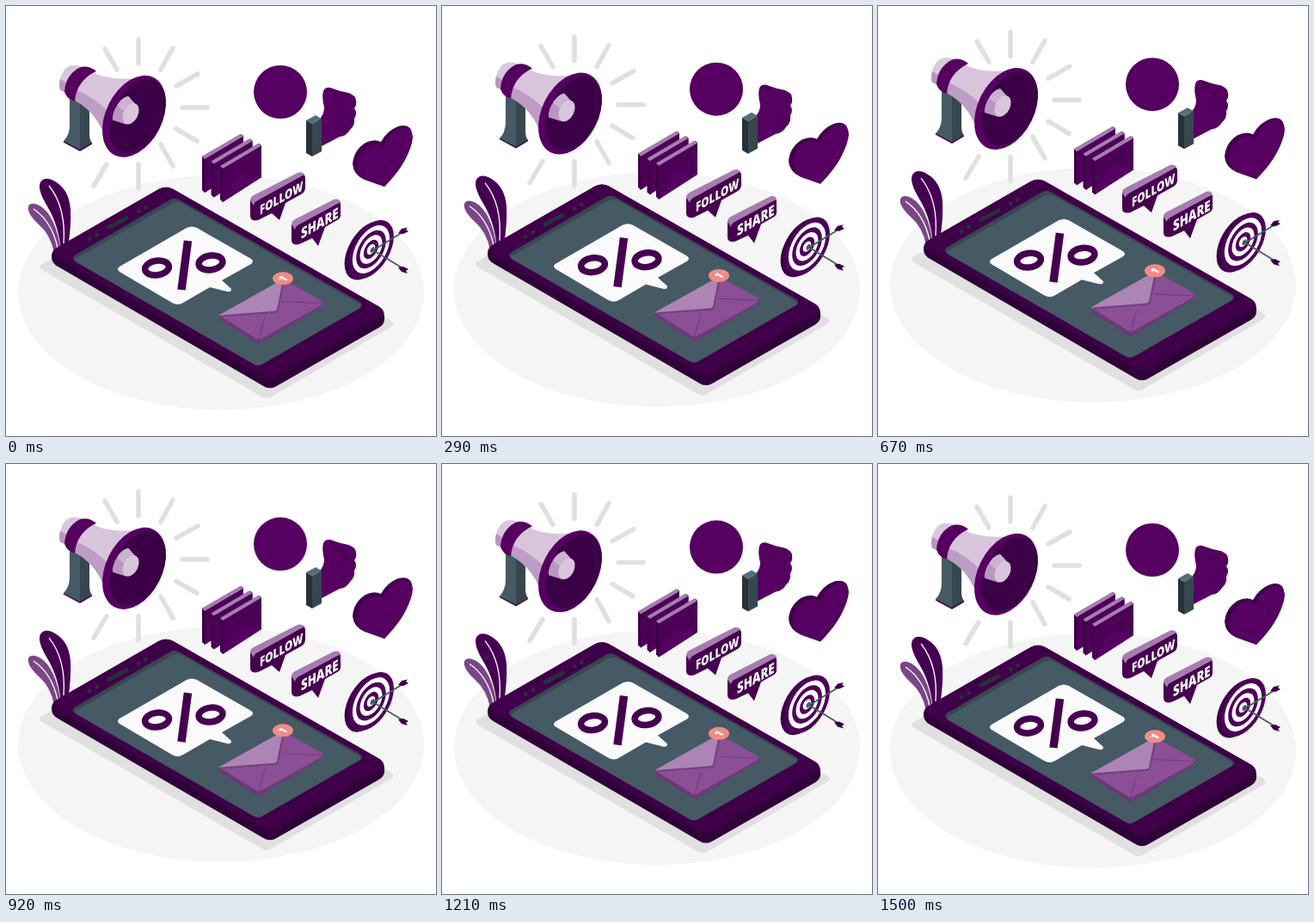
Write an HTML page that moves like this. It is 500 px wide and 500 px high and loops after 1540 ms.

```html
<!DOCTYPE html>
<html lang="en">
<head>
<meta charset="utf-8">
<title>Isometric phone promotion</title>
<style>
  html, body { margin: 0; width: 100%; height: 100%; overflow: hidden; background: #fff; }
  svg { display: block; width: 100vw; height: 100vh; }
  text { font: 800 15px "Open Sans", "Noto Sans", sans-serif; fill: #fff; }
  .dark { fill: #3c0046; }
  .plum { fill: #560062; }
  .lilac { fill: #a67db0; }
  .line { fill: none; stroke: #3c0046; stroke-linecap: round; stroke-linejoin: round; }
</style>
</head>
<body>
<svg viewBox="0 0 500 500">
  <defs>
    <g id="mail">
      <path class="dark" d="M228 175L273 149L276 151V188L231 217L228 214Z"/>
      <path fill="#4d0058" d="M231 178L276 152V188L231 217Z"/>
      <path class="plum" d="M231 217L250 183L276 188Z"/>
      <path class="lilac" d="M228 175L272 149L276 151.500L231 178Z"/>
      <path class="line" d="M231 180L252 184L275 154"/>
    </g>
  </defs>
  <g id="scene">
    <ellipse cx="250" cy="333" rx="236" ry="136.500" fill="#f5f5f5"/>
    <path fill="#e0e0e0" d="M42 300L62 289L430 355L448 366Q453 370 448 373L309 454Q303 458 297 454L42 307Q36 303 42 300Z"/>

    <!-- Plant -->
    <path fill="#7b4687" d="M56 287Q52 266 38 254Q24 241 26 233Q29 227 39 232Q58 243 64 286Z"/>
    <path fill="#460052" d="M64 287Q62 256 48 233Q36 213 40 205Q45 197 57 204Q73 213 75 236Q76 257 72 280Z"/>
    <path fill="none" stroke="#fff" stroke-width="1.300" d="M50 209Q70 234 67 276M32 236Q53 250 60 281"/>

    <!-- Phone -->
    <g transform="translate(0 .7)">
      <path fill="#300039" d="M58 281L178 212Q186 208 194 212L434 349Q440 353 440 360V364Q440 369 434 373L315 441Q307 446 299 441L60 302Q53 298 53 291Q53 284 58 281Z"/>
      <path fill="#400049" d="M58 281L178 212Q186 208 194 212L434 349Q443 355 434 361L315 429Q307 434 299 429L60 291Q52 286 58 281Z"/>
      <path fill="#37474f" d="M80 289L190 225Q196 221 202 225L411 343Q417 347 411 351L299 415Q293 419 287 415L80 296Q76 292 80 289Z"/>
      <path fill="#455a64" d="M83 292L193 229Q199 226 205 229L410 345Q415 348 410 351L299 415Q293 419 287 415L82 297Q79 294 83 292Z"/>
      <g fill="none" stroke="#263238" stroke-linecap="round">
        <path stroke-width="5" d="M120 256.500L140 246"/>
        <path stroke-width="4.500" d="M97 270.500h.5M105.500 265.500h.5M154 238h.5M162 233.500h.5"/>
      </g>
    </g>

    <!-- Offer bubble -->
    <path fill="#fafafa" d="M132 303L210 258Q216 255 222 258L285 294Q289 297 285 300L251 319L262 329Q262 333 257 332L237 327L206 345Q200 349 193 345L132 309Q128 306 132 303Z"/>
    <g fill="none" stroke="#45004f" stroke-width="7.500">
      <ellipse cx="175.500" cy="304.500" rx="14" ry="8.300" transform="rotate(-8 175.500 304.500)"/>
      <ellipse cx="238" cy="298.500" rx="14" ry="8.300" transform="rotate(-8 238 298.500)"/>
      <path stroke-width="9.500" d="M211.500 273L204 330"/>
    </g>

    <!-- Message -->
    <g transform="translate(0 .7)">
      <path fill="#6c3a77" d="M248 359L294 385L369 343V348L297 391Q294 393 291 391L248 364Z"/>
      <path fill="#8a4f94" d="M248 359L319 319Q322 317 326 319L367 342Q370 344 367 347L297 386Q294 388 291 386Z"/>
      <path fill="none" stroke="#74407e" stroke-width="1.200" d="M294 387L301 361M368 345L321 343"/>
      <path fill="#74407e" d="M248 361L313 356Q316 356 317 352L324 319Z"/>
      <path fill="#ac84b5" d="M247 359L322 317L315 352Q314 354 311 354Z"/>
      <ellipse cx="322" cy="316" rx="12" ry="7.500" fill="#f28b86"/>
      <text transform="matrix(.866 -.5 .866 .5 322 316)" x="-4" y="4.500" style="font-size:12.500px">1</text>
    </g>

    <!-- Megaphone -->
    <path fill="none" stroke="#e0e0e0" stroke-width="5.500" stroke-linecap="round" d="M154 39V67M115 50L129 74M194 49L180 74M223 79L198 93M234 118H205M222 157L198 143M194 186L180 161M154 212V184M117 184L102 209"/>
    <path fill="#455a64" d="M74 106H86V168L67 157Q74 150 74 138Z"/>
    <path fill="#37474f" d="M86 106H97V148Q97 156 100 159L86 168Z"/>
    <path class="line" stroke-width="1.500" d="M67.500 158L86 168L99.500 160"/>
    <g transform="translate(0 .8)">
      <path fill="#d8c8de" d="M86 69Q76 66 69 72Q60 83 63 97L72 101L94 72Z"/>
      <path fill="#b996c1" d="M63 84Q61 92 63 97L72 101L76 92Z"/>
      <path fill="#d8c5dc" d="M99 75Q120 88 161 82L118 160Q108 124 80 109Q78 90 99 75Z"/>
      <path fill="#bd9cc5" d="M80 96Q103 105 123 126L117 158Q108 124 80 109Z"/>
      <path fill="#55005f" d="M85 71Q95 67 105 75Q82 86 80 110Q71 108 68 99Q69 80 85 71Z"/>
      <g transform="rotate(26.500 149 127.500)">
        <ellipse class="plum" cx="149" cy="127.500" rx="32.800" ry="50.500"/>
        <ellipse class="dark" cx="152.500" cy="125.500" rx="28.500" ry="46"/>
      </g>
      <path fill="#b996c1" d="M142 104Q134 106 127 118Q123 127 124 132L140 137L150 113Z"/>
      <path fill="#cbb2d1" d="M142 104Q134 106 129 115L140 124L150 113Z"/>
      <ellipse cx="145" cy="124.500" rx="8.500" ry="13" transform="rotate(26.500 145 124.500)" fill="#d8c5dc"/>
    </g>

    <!-- Floating icons -->
    <circle class="plum" cx="319" cy="100" r="31"/>

    <path class="plum" d="M363 133Q370 127 370 118Q367 106 369 99Q371 94 377 95L389 99L398 101Q407 104 407 110Q408 115 405 119Q409 124 405 131Q406 139 400 144Q396 151 388 152L367 163Z"/>
    <path class="line" stroke-width="1.200" d="M377 96Q383 101 384 108L391 110L399 102M390 121L405 112M390 132L405 122M389 142L403 133"/>
    <path fill="#263238" d="M349 133L356 137V175L349 171Z"/>
    <path fill="#37474f" d="M356 137L367 131V169L356 175Z"/>
    <path fill="#546e7a" d="M349 133L360 127L367 131L356 137Z"/>

    <path fill="#42004c" d="M440 210L417 202Q404 196 403 184Q404 168 418 159Q428 154 436 158Q443 145 456 140Q467 137 471 144Q474 152 470 164Q464 186 440 210Z"/>
    <path class="plum" d="M440 210L421 203Q408 197 408 186Q410 169 423 162Q433 157 438 165Q445 147 459 142Q472 139 473 152Q472 174 440 210Z"/>

    <use href="#mail"/>
    <use href="#mail" x="10.500" y="5.500"/>
    <use href="#mail" x="21" y="11"/>

    <path fill="#46004f" d="M284 226L342 195Q348 195 348 200V211Q348 216 343 219L325 229L318 249L309 241L293 249Q284 251 284 244Z"/>
    <path class="lilac" d="M284 226Q284 222 288 220L339 194Q345 192 347 196L291 227Q288 229 288 232Z"/>
    <text transform="matrix(.78 -.45 0 1 295 243)">FOLLOW</text>

    <path fill="#46004f" d="M332 254L384 226Q389 226 389 231V243Q389 247 385 249L371 257L363 279L356 270L341 277Q332 279 332 272Z"/>
    <path class="lilac" d="M332 254Q332 250 336 248L381 225Q387 223 389 228L339 255Q336 257 336 260Z"/>
    <text transform="matrix(.78 -.45 0 1 343 271)" style="font-size:17px">SHARE</text>

    <!-- Target -->
    <g id="rings"></g>
    <path fill="none" stroke="#455a64" stroke-width="1.800" d="M427 284L463 262M427 284L463 306"/>
    <path class="dark" d="M456 264L460 259L467 257.500L465 260L468 262L462 265ZM456 304L460 309L467 311L465 308L468 306L462 303Z"/>
  </g>
</svg>
<script>
const LOOP = 1540, STEPS = 37, PEAK = 17, LIFT = 9.4;
const scene = document.getElementById('scene');

const disc = (r, fill, x = 424.5, y = 283) =>
  `<circle r="${r}" fill="${fill}" transform="matrix(.866 -.5 0 1 ${x} ${y})"/>`;
document.getElementById('rings').innerHTML = disc(30.5, '#3c0046', 420, 284.5) +
  [30.5, 25, 20, 15, 10, 5.5].map((r, i) => disc(r, i % 2 ? '#fff' : '#4d0058')).join('') +
  disc(3, '#455a64', 426, 283.5);

// The whole scene rises and sinks at an even pace, stepped at 24 fps.
function draw(now) {
  const step = Math.floor(now % LOOP / LOOP * STEPS);
  const rise = step < PEAK ? step / PEAK : (STEPS - 1 - step) / (STEPS - 1 - PEAK);
  scene.setAttribute('transform', `translate(0 ${-LIFT * rise})`);
  requestAnimationFrame(draw);
}
draw(performance.now());
</script>
</body>
</html>
```
